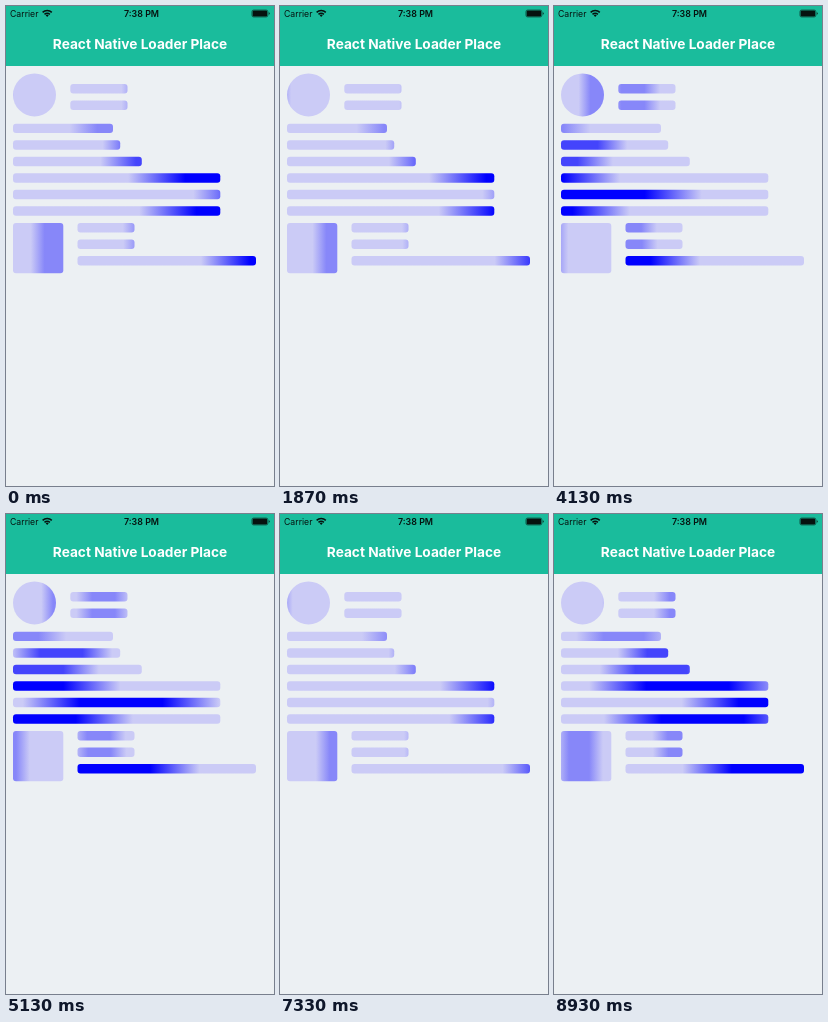
Write an HTML page that moves like this. It is 268x480 px and loops after 8.99 s.

```html
<!DOCTYPE html>
<html lang="en">
<head>
<meta charset="utf-8">
<title>Loader</title>
<style>
  html, body { margin: 0; width: 100%; height: 100%; overflow: hidden; background: #ecf0f3; }
  svg { display: block; width: 268px; height: 480px; }
  text { font-family: Inter, "Liberation Sans", sans-serif; }
</style>
</head>
<body>
<svg viewBox="0 0 268 480" xmlns="http://www.w3.org/2000/svg">
  <defs id="defs"></defs>
  <rect width="268" height="480" fill="#ecf0f3"/>
  <rect width="268" height="60" fill="#1abc9c"/>
  <g fill="#06120f">
    <text x="4" y="10.6" font-size="8.7">Carrier</text>
    <text x="135.5" y="10.6" font-size="8.9" font-weight="600" text-anchor="middle">7:38 PM</text>
    <g fill="none" stroke="#06120f" stroke-width="1.5">
      <path d="M36.6 6.4a6.6 6.6 0 0 1 9.2 0"/>
      <path d="M38.5 8.4a4 4 0 0 1 5.4 0"/>
    </g>
    <path d="M41.2 10.9l-1.5-1.6a2.2 2.2 0 0 1 3 0z"/>
    <rect x="245.9" y="4" width="16" height="7" rx="1.8" fill="none" stroke="#06120f" stroke-width=".5"/>
    <rect x="246.6" y="4.6" width="14.6" height="5.8" rx="1.2"/>
    <path d="M262.8 6.2a1.4 1.4 0 0 1 0 2.6z"/>
  </g>
  <text x="134" y="42.7" font-size="13.7" font-weight="700" fill="#fff" text-anchor="middle">React Native Loader Place</text>
  <g id="items"></g>
</svg>
<script>
const NS = 'http://www.w3.org/2000/svg';
const LOOP = 8990, STEP = 1000 / 15, CYCLE = 907;
const BASE = [203, 203, 246], PEAK = [0, 0, 255];
const SPAN = .95, RAMP = .29; // sweep length per width, ramp per sweep
const LEFT = 7, PITCH = 16.53, BAR = 9.4;

const defs = document.getElementById('defs');
const group = document.getElementById('items');
const items = [];

function make(tag, attrs, parent) {
  const el = document.createElementNS(NS, tag);
  for (const key in attrs) el.setAttribute(key, attrs[key]);
  return parent.appendChild(el);
}

const mix = k => 'rgb(' + BASE.map((c, i) => Math.round(c + (PEAK[i] - c) * k)) + ')';

function ease(x) {
  const half = v => Math.pow(2 * v, 1.7) / 2;
  return x < .5 ? half(x) : 1 - half(1 - x);
}

// Wider placeholders get a stronger sweep, in thirds.
function place(x, y, width, phase, height = BAR, rx = 3) {
  const id = 'sweep' + items.length;
  const peak = mix(Math.round(width / 68) / 3);
  const grad = make('linearGradient', { id, gradientUnits: 'userSpaceOnUse', y1: 0, y2: 0 }, defs);
  [[0, mix(0)], [RAMP, peak], [1 - RAMP, peak], [1, mix(0)]].forEach(([offset, color]) =>
    make('stop', { offset, 'stop-color': color }, grad));
  make('rect', { x, y, width, height, rx, fill: `url(#${id})` }, group);
  items.push({ x, width, phase, grad });
}

// Each list holds [width, phase] for bars stacked one pitch apart.
const stack = (x, y, bars) =>
  bars.forEach(([width, phase], i) => place(x, y + i * PITCH, width, phase));

place(LEFT, 67.4, 43, .07, 43, 21.5);
stack(64.3, 78, [[57.2, .865], [57.2, .865]]);
stack(LEFT, 117.7, [
  [100, .69], [107.2, .825], [128.8, .74],
  [207.3, .685], [207.3, .847], [207.3, .708]
]);
place(LEFT, 217, 50.3, .607, 50.3);
stack(71.5, 217, [[57, .8], [57, .805], [178.5, .746]]);

function draw(ms) {
  const time = Math.floor((ms + 4) / STEP) * STEP;
  for (const { x, width, phase, grad } of items) {
    const span = width * SPAN;
    const left = x - span + ease((phase + time / CYCLE) % 1) * (width + span);
    grad.setAttribute('x1', left.toFixed(2));
    grad.setAttribute('x2', (left + span).toFixed(2));
  }
}

const start = performance.now();
function loop() {
  draw((performance.now() - start) % LOOP);
  requestAnimationFrame(loop);
}
loop();
</script>
</body>
</html>
```
